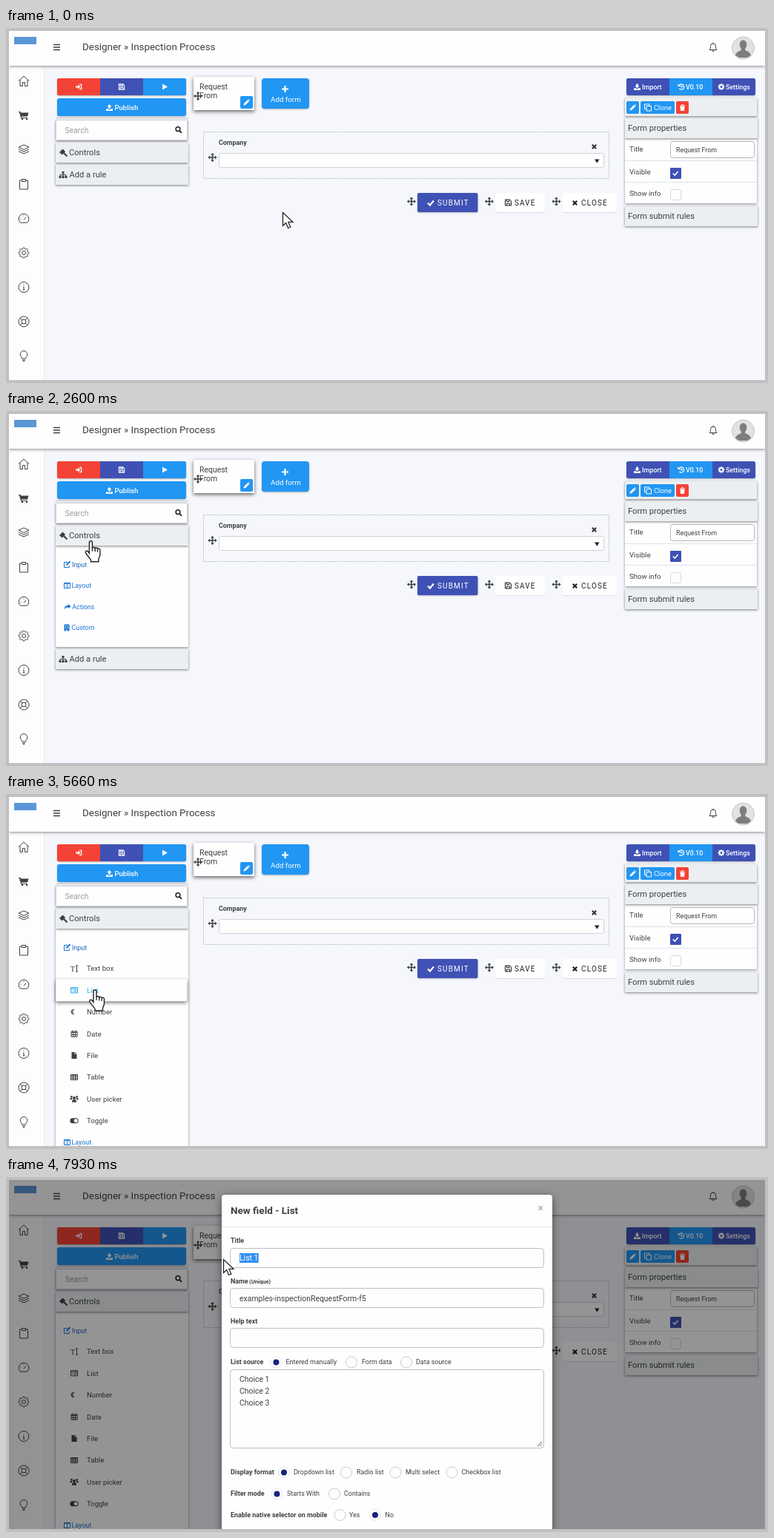
Recreate the animation shown at these times as an HTML page with a canvas. Size 1028 by 480 pixels, loop 8 s.

```html
<!DOCTYPE html>
<html lang="en">
<head>
<meta charset="utf-8">
<title>Form designer</title>
<style>
html, body { margin: 0; width: 100%; height: 100%; overflow: hidden; background: #c0c0c0; }
canvas { display: block; }
</style>
</head>
<body>
<canvas id="stage" width="1028" height="480"></canvas>
<script>
const ctx = document.getElementById('stage').getContext('2d');
const LOOP = 8000;
const RED = '#f44336', INDIGO = '#3f51b5', BLUE = '#2196f3', NAVY = '#1a237e';
const INK = '#3c4043', LINK = '#1976d2', BAR = '#eceff1';

// ---------- helpers ----------
const ramp = (t, a, b) => {
  const p = Math.min(1, Math.max(0, (t - a) / (b - a)));
  return p * p * (3 - 2 * p);
};

function text(s, x, cy, size, color = INK, weight = 400, spacing = 0) {
  ctx.font = `${weight} ${size}px Roboto, sans-serif`;
  ctx.letterSpacing = spacing + 'px';
  ctx.fillStyle = color;
  ctx.fillText(s, x, cy + size * 0.355);
}

function box(x, y, w, h, fill, { r = 0, stroke, blur = 0, dy = 1, shade = 0.4 } = {}) {
  ctx.save();
  ctx.beginPath();
  ctx.roundRect(x, y, w, h, r);
  if (blur) {
    ctx.shadowColor = `rgba(0,0,0,${shade})`;
    ctx.shadowBlur = blur;
    ctx.shadowOffsetY = dy;
  }
  ctx.fillStyle = fill;
  ctx.fill();
  ctx.restore();
  if (stroke) {
    ctx.beginPath();
    ctx.roundRect(x + 0.5, y + 0.5, w - 1, h - 1, r);
    ctx.strokeStyle = stroke;
    ctx.lineWidth = 1;
    ctx.stroke();
  }
}

function icon(d, x, y, { fill, stroke, w = 1, s = 1 }) {
  const p = new Path2D(d);
  ctx.save();
  ctx.translate(x, y);
  ctx.scale(s, s);
  if (fill) { ctx.fillStyle = fill; ctx.fill(p, 'evenodd'); }
  if (stroke) { ctx.strokeStyle = stroke; ctx.lineWidth = w; ctx.stroke(p); }
  ctx.restore();
}

function disc(x, y, r, fill, stroke, w = 1) {
  ctx.beginPath();
  ctx.arc(x, y, r, 0, Math.PI * 2);
  if (fill) { ctx.fillStyle = fill; ctx.fill(); }
  if (stroke) { ctx.strokeStyle = stroke; ctx.lineWidth = w; ctx.stroke(); }
}

function gear(x, y, r, hole, solid) {
  ctx.beginPath();
  for (let i = 0; i < 32; i++) {
    const a = (i - 0.5) / 32 * Math.PI * 2, q = i % 4 < 2 ? r : r * 0.78;
    ctx.lineTo(x + q * Math.cos(a), y + q * Math.sin(a));
  }
  ctx.closePath();
  if (solid) { ctx.fillStyle = '#fff'; ctx.fill(); disc(x, y, hole, INDIGO); }
  else { ctx.strokeStyle = INK; ctx.lineWidth = 1; ctx.stroke(); disc(x, y, hole, null, INK); }
}

// ---------- icon shapes, centred on 0,0 ----------
const I = {
  move: 'M-6 0l2.5-2.5v1.7h2.7v-2.7h-1.7L0-6l2.5 2.5h-1.7v2.7h2.7v-1.7L6 0l-2.5 2.5v-1.7h-2.7v2.7h1.7L0 6l-2.5-2.5h1.7v-2.7h-2.7v1.7z',
  check: 'M-4 0l3 3 5-6',
  times: 'M-2.7-2.7l5.4 5.4M2.7-2.7l-5.4 5.4',
  save: 'M-4-4h6l2 2v6h-8zM-2-4v2.5h3.5v-2.5M-2 4v-3h4v3',
  play: 'M-3-4l7 4-7 4z',
  upload: 'M0-5l3.5 3.5h-2v3h-3v-3h-2zM-5 2h3v1h4v-1h3v3h-10z',
  download: 'M0 2l3.5-3.5h-2v-3h-3v3h-2zM-5 2h3l2 1.4 2-1.4h3v3h-10z',
  exitArrow: 'M-4-1h3v-2l3.5 3-3.5 3v-2h-3z',
  exitFrame: 'M1-3.2h2.6v6.4h-2.6',
  pencil: 'M-4 4l.6-2.6 5-5 2 2-5 5zM2.2-4l.6-.5 2 2-.6.6z',
  trash: 'M-3.5-3h7v1h-7zM-1.2-4.2h2.4v1h-2.4zM-3-1.5h6l-.5 6h-5z',
  clone: 'M-2-2h6.5v6.5h-6.5zM-2 2h-2.5v-6.5h6.5v2.5',
  history: 'M-3.2-1.6A3.6 3.6 0 1 1-2.6 2.5M0-2v2.2h1.8',
  historyTip: 'M-4.6-4v3.6h3.6z',
  sitemap: 'M-1.5-4.5h3v3h-3zM-5.5 1.5h3v3h-3zM-1.5 1.5h3v3h-3zM2.5 1.5h3v3h-3z',
  sitemapLines: 'M0-1.5v3M-4 1.5v-1.5h8v1.5',
  gavel: 'M-5.5-.5l4.5-4.5 3.6 3.6-4.5 4.5z',
  edit: 'M2.3 1v3h-6.8v-7h4.5',
  columns: 'M-4-3.5h8v7h-8zM0-3.5v7M-4-2.8h8',
  share: 'M1-4.5l4 3.5-4 3.5v-2c-3 0-4.5.6-5.5 3.2-.4-3.5 1.4-6 5.5-6.2z',
  building: 'M-3.5-4.5h7v9h-7zM-2-3h1.2v1.2h-1.2zM.8-3h1.2v1.2h-1.2zM-2-.5h1.2v1.2h-1.2zM.8-.5h1.2v1.2h-1.2zM-.7 2.5h1.4v2h-1.4z',
  list: 'M-4.5-3.5h9v7h-9zM-4.5-2.7h9M-3-.7h1M-1-.7h4.5M-3 1.5h1M-1 1.5h4.5',
  date: 'M-4-3h8v7h-8zM-4-1.8h8M-4 1.2h8M-1.3-1.5v5.5M1.4-1.5v5.5M-2.2-4.7v2M2.2-4.7v2',
  file: 'M-3.5-4.5h4v3h3v6h-7zM1.2-4.5l2.3 2.3h-2.3z',
  table: 'M-4.5-3.5h9v7h-9zM-4.5-2.8h9M-4.5-.8h9M-4.5 1.4h9M-1.5-3v6.5M1.5-3v6.5',
  users: 'M-2-1.5a2 2 0 1 1 4 0a2 2 0 1 1-4 0zM-3 4.3c0-3 1-3.6 3-3.6s3 .6 3 3.6zM-5-3a1.4 1.4 0 1 1 2.8 0a1.4 1.4 0 1 1-2.8 0zM2.2-3a1.4 1.4 0 1 1 2.8 0a1.4 1.4 0 1 1-2.8 0zM-5.6 1c0-2 .5-2.5 2.6-2.3l.4 2zM5.6 1c0-2-.5-2.5-2.6-2.3l-.4 2z',
  toggle: 'M-2.2-3.5h4.4a3.5 3.5 0 0 1 0 7h-4.4a3.5 3.5 0 0 1 0-7zM2.2-2.5a2.5 2.5 0 1 0 .01 0z',
  home: 'M-7-.5l7-6.5 7 6.5M-5-2v8.5h3.5v-5h3v5h3.5v-8.5',
  cart: 'M-7-5h2.5l.6 1.5h10.4l-1.5 5h-8.3l.3 1.2h7.5v1h-8.5l-2-7.7h-1z',
  layers: 'M0-6l7 3.2-7 3.2-7-3.2zM-7 0l7 3.2 7-3.2M-7 2.8l7 3.2 7-3.2',
  clipboard: 'M-2.5-5h-3v12h11v-12h-3M-2.5-6.5h5v3h-5z',
  gauge: 'M-4.5 5.2A6.8 6.8 0 1 1 4.5 5.2zM0 1.2l3-3.4M-4.6 0h1M0-4.6v1',
  bulb: 'M-2.5 3.5c0-2-2.3-3-2.3-5.7a4.8 4.8 0 0 1 9.6 0c0 2.7-2.3 3.7-2.3 5.7zM-2 5.5h4M-1.2 7h2.4',
  bell: 'M-5 3.5c1.5-1.5 1.5-3 1.5-5a3.5 3.5 0 0 1 7 0c0 2 0 3.5 1.5 5zM-1.3 4.2a1.3 1.6 0 0 0 2.6 0M0-5v-1.3',
  buoy: 'M-5-5l3 3M5-5l-3 3M-5 5l3-3M5 5l-3-3',
  arrow: 'M0 0v18l4.2-4 2.9 7 3.2-1.4-2.9-6.7h6z',
  hand: 'M-2 2a2 2 0 0 1 4 0v8c.3-2 3.6-2 3.8.3.6-1.6 3.4-1.2 3.5.7.8-1.3 3.2-.8 3.2 1.2v6c0 3-2 4.5-2 7v2.8h-10.5v-2.5c-1.5-2.5-4.5-5-7-9.5-1-2 1.5-3.5 3-2l2 2.5z',
  handLines: 'M2 9v5M5.8 11v3.5M9.3 12v3',
  beam: 'M-3-8.5q3 0 3 1.5v14q0 1.5-3 1.5M3-8.5q-3 0-3 1.5v14q0 1.5 3 1.5'
};

// ---------- page ----------
function drawFrame() {
  box(4, 4, 1020, 472, '#f5f7fc');
  box(4, 52, 47, 424, '#fdfdfd');
  box(51, 52, 1, 424, '#e9ebf0');
  box(4, 4, 1020, 47, '#fefefe', { blur: 4, shade: 0.45 });
  box(11, 12, 30, 10, '#5b96d6');
  icon('M-4.5-3.5h9M-4.5 0h9M-4.5 3.5h9', 68.5, 26, { stroke: INK, w: 1.6 });
  text('Designer » Inspection Process', 103, 25.5, 13.4);
  icon(I.bell, 954, 26, { stroke: INK });

  disc(994.5, 27, 15, '#e2e2e2', '#c4c4c4');
  ctx.save();
  ctx.beginPath();
  ctx.arc(994.5, 27, 14, 0, 7);
  ctx.clip();
  icon('M-4.8-5a4.8 5.8 0 0 1 9.6 0c0 3-1 4.6-2 5.6v2.4c2 1.6 8 2 8.4 10h-22.4c.4-8 6.4-8.4 8.4-10v-2.4c-1-1-2-2.6-2-5.6z', 994.5, 27, { fill: '#7d7d7d' });
  ctx.restore();

  const thin = { stroke: INK };
  icon(I.home, 24, 72, thin);
  icon(I.cart, 24, 118, { fill: INK });
  disc(22, 123, 1.3, INK);
  disc(28, 123, 1.3, INK);
  icon(I.layers, 24, 164, thin);
  icon(I.clipboard, 24, 211, thin);
  icon(I.gauge, 24, 258, thin);
  gear(24, 304, 7, 2.5);
  disc(24, 350.5, 7, null, INK);
  icon('M-1-.5h1v4M-1.3 3.5h2.8M-.5-3.3h1', 24, 350.5, thin);
  disc(24, 397, 7, null, INK);
  disc(24, 397, 3, null, INK);
  icon(I.buoy, 24, 397, thin);
  icon(I.bulb, 24, 443.5, thin);
}

function bar(x, y, label, lx) {
  box(x, y, 179, 27, BAR, { blur: 3, shade: 0.5 });
  text(label, lx, y + 13.5, 11.15);
}

function tripleButtons(x, colors) {
  box(x, 68, 174, 23, colors[1], { r: 3, blur: 2, shade: 0.3 });
  ctx.save();
  ctx.beginPath();
  ctx.roundRect(x, 68, 174, 23, 3);
  ctx.clip();
  colors.forEach((c, i) => box(x + i * 58, 68, 58, 23, c));
  ctx.restore();
}

function drawCentre() {
  box(253, 66, 82, 45, '#fefefe', { blur: 5, dy: 2, shade: 0.6 });
  text('Request', 261, 79, 10.45);
  text('From', 261, 91, 10.45);
  icon(I.move, 259, 92, { fill: INK });
  box(316, 92, 17, 17, BLUE, { r: 2 });
  icon(I.pencil, 324.5, 100.5, { fill: '#fff' });
  box(345, 68, 64, 41, BLUE, { r: 4, blur: 2, shade: 0.3 });
  icon('M-4.5 0h9M0-4.5v9', 376.5, 82.5, { stroke: '#fff', w: 2.2 });
  text('Add form', 357, 97, 9.8, '#fff');

  ctx.setLineDash([2, 1]);
  ctx.strokeStyle = '#bfc2c8';
  ctx.lineWidth = 1;
  ctx.strokeRect(266.5, 140.5, 547, 63);
  ctx.setLineDash([]);
  text('Company', 287, 155, 8.9, INK, 700);
  icon(I.times, 793.5, 160.5, { stroke: '#333', w: 2 });
  icon(I.move, 278.5, 175, { fill: INK });
  box(287, 169, 520, 20, '#fefefe', { r: 2, stroke: '#cfd1d6' });
  icon('M-3.2-2.5h6.4l-3.2 5.2z', 797.3, 180, { fill: '#222' });

  [547, 652, 742.5].forEach(x => icon(I.move, x, 234.5, { fill: INK }));
  box(555, 223, 81.5, 26, INDIGO, { r: 2, blur: 2, shade: 0.25 });
  box(660, 223, 67, 26, '#fefefe', { r: 2, blur: 1, shade: 0.1 });
  box(751, 223, 73, 26, '#fefefe', { r: 2, blur: 1, shade: 0.1 });
  icon(I.check, 573, 236.5, { stroke: '#fff', w: 2.2 });
  text('SUBMIT', 582, 236, 10, '#fff', 400, 1.15);
  icon(I.save, 677.5, 236, { stroke: '#222' });
  text('SAVE', 686, 236, 10, '#222', 400, 1.15);
  icon(I.times, 767.5, 236.5, { stroke: '#222', w: 2.2 });
  text('CLOSE', 776, 236, 10, '#222', 400, 1.15);
}

function drawRight() {
  tripleButtons(837, [INDIGO, BLUE, INDIGO]);
  icon(I.download, 851.5, 79.5, { fill: '#fff', s: 0.9 });
  text('Import', 858, 79.5, 8.9, '#fff', 500);
  icon(I.history, 911, 79.5, { stroke: '#fff', w: 1.3 });
  icon(I.historyTip, 911, 79.5, { fill: '#fff' });
  text('V0.10', 917, 79.5, 8.9, '#fff', 500);
  gear(965, 79.5, 4.5, 1.5, true);
  text('Settings', 971, 79.5, 8.9, '#fff', 500);

  box(835, 95, 178, 24, BAR, { blur: 3, shade: 0.5 });
  box(837, 99, 17, 17, BLUE, { r: 2 });
  icon(I.pencil, 845.5, 107.5, { fill: '#fff' });
  box(856, 99, 46, 17, BLUE, { r: 2 });
  icon(I.clone, 866, 107.5, { stroke: '#fff' });
  text('Clone', 874, 107.5, 9.4, '#fff');
  box(904, 99, 17, 17, RED, { r: 2 });
  icon(I.trash, 912.5, 107.5, { fill: '#fff' });

  box(835, 149, 178, 88, '#fefefe', { blur: 3, shade: 0.45 });
  bar(835, 122, 'Form properties', 839);
  box(835, 179, 178, 1, '#dde1e8');
  box(835, 208, 178, 1, '#dde1e8');
  text('Title', 841, 164, 9.6);
  text('Visible', 841, 194.5, 9.6);
  text('Show info', 841, 223.5, 9.6);
  box(896, 153, 114, 23, '#fefefe', { r: 3, stroke: '#b4b6ba' });
  text('Request From', 904, 164.5, 8.9);
  box(896, 189, 15, 15, INDIGO, { r: 1 });
  icon(I.check, 903.2, 196.5, { stroke: '#fff', w: 1.8, s: 0.85 });
  box(896, 218, 15, 15, '#fefefe', { r: 2, stroke: '#d8dae0' });
  bar(835, 241, 'Form submit rules', 839);
}

const FIELDS = ['Text box', 'List', 'Number', 'Date', 'File', 'Table', 'User picker', 'Toggle'];

function fieldIcon(i, y, c) {
  const x = 92, line = { stroke: c };
  if (i === 0) {
    ctx.font = '11px "Liberation Serif", serif';
    ctx.fillStyle = c;
    ctx.fillText('T', 86.5, y + 4);
    icon('M-1.3-4.2h2.6M0-4.2v8.4M-1.3 4.2h2.6', 95.5, y, line);
  } else if (i === 2) text('€', 87, y, 9.6, c, 700);
  else if (i === 4 || i > 5) icon([I.file, I.users, I.toggle][i === 4 ? 0 : i - 5], x, y, { fill: c });
  else icon({ 1: I.list, 3: I.date, 5: I.table }[i], x, y, line);
}

function fieldLift(i, t) {
  if (i === 0) return ramp(t, 4980, 5150) - ramp(t, 5150, 5350);
  return i === 1 && t < 6000 ? ramp(t, 5200, 5640) : 0;
}

function drawFields(t) {
  FIELDS.forEach((label, i) => {
    const y = 236 + i * 29.4, lift = fieldLift(i, t);
    if (lift > 0) box(67, y - 15.2, 177, 30, '#fefefe', { r: 2, blur: 5 * lift, dy: 2, shade: 0.55 * lift });
    const c = lift > 0.5 && t < 5930 ? '#29a9ea' : INK;
    fieldIcon(i, y, c);
    text(label, 109, y, 9.6, c);
  });
}

function drawLeft(t) {
  tripleButtons(69, [RED, INDIGO, BLUE]);
  icon(I.exitArrow, 98, 79.5, { fill: '#fff' });
  icon(I.exitFrame, 98, 79.5, { stroke: '#fff', w: 1.3 });
  icon(I.save, 156, 79.5, { stroke: '#fff', w: 1.2, s: 0.9 });
  icon(I.play, 214, 79.5, { fill: '#fff' });
  box(67, 121, 179, 1, '#c9ccd2');
  box(69, 95, 174, 24, BLUE, { r: 3, blur: 2, shade: 0.3 });
  icon(I.upload, 139.5, 107.5, { fill: '#fff', s: 0.9 });
  text('Publish', 146.5, 107.5, 9.5, '#fff', 500);
  box(67, 124, 178, 28, '#fefefe', { r: 1, stroke: '#cdd0d5', blur: 3, shade: 0.5 });
  text('Search', 79.5, 138.5, 10.4, '#9a9da1');
  disc(232, 136.7, 2.9, null, '#222', 1.5);
  icon('M0 0l3 3', 234, 138.8, { stroke: '#222', w: 1.8 });

  const open = ramp(t, 2180, 2530), sub = ramp(t, 3840, 4220) * 235;
  const h = (137 + sub) * open;
  if (h > 0) {
    box(67, 182, 179, h, '#fefefe', { blur: 3, shade: 0.45 });
    ctx.save();
    ctx.beginPath();
    ctx.rect(60, 182, 192, h);
    ctx.clip();
    icon(I.edit, 83, 207.5, { stroke: LINK });
    icon('M-1.5.8l5-5', 83, 207.5, { stroke: LINK, w: 2 });
    text('Input', 89, 207.5, 8.9, '#1d5fc0');
    if (sub > 0) {
      ctx.save();
      ctx.beginPath();
      ctx.rect(60, 218, 192, sub);
      ctx.clip();
      drawFields(t);
      ctx.restore();
    }
    icon(I.columns, 82.5, 236 + sub, { stroke: LINK });
    text('Layout', 88.5, 236 + sub, 8.9, LINK);
    icon(I.share, 83, 265 + sub, { fill: LINK, s: 0.9 });
    text('Actions', 89.3, 265 + sub, 8.9, LINK);
    icon(I.building, 82, 293 + sub, { fill: LINK });
    text('Custom', 88.5, 293 + sub, 8.9, LINK);
    ctx.restore();
  }
  bar(67, 155, 'Controls', 85);
  icon(I.gavel, 77.5, 168.5, { fill: INK });
  icon('M0 0l5 5', 77.5, 168.5, { stroke: INK, w: 2.2 });
  const y = 185 + h;
  bar(67, y, 'Add a rule', 85.5);
  icon(I.sitemap, 77, y + 13.5, { fill: INK });
  icon(I.sitemapLines, 77, y + 13.5, { stroke: INK });
  if (t >= 2900 && t < 4800) box(4, 474, 66, 2, '#222');
}

// ---------- dialog ----------
function radios(y, label, options, chosen, dot) {
  text(label, 303, y, 8.95, INK, 700);
  options.forEach(([x, tx, name], i) => {
    disc(x, y + 0.5, 7.5, '#fefefe', i === chosen ? '#e6e6ec' : '#c9cacd');
    if (i === chosen) disc(x, y + 0.5, 4, dot);
    text(name, tx, y, 8.95);
  });
}

function drawTitleField(t, mouse) {
  text('List 1', 315, 109.7, 10.45);
  if (t < 7660) {
    if ((t - 5900) % 1060 < 530) box(340, 103, 1, 13, '#111');
    return;
  }
  // selection grows leftwards, snapping to letters
  ctx.font = '10.45px Roboto, sans-serif';
  const edges = [...'List 1'].map((c, i) => 315 + ctx.measureText('List 1'.slice(0, i)).width);
  const from = edges.find((e, i) => mouse.x <= (e + (edges[i + 1] || 341)) / 2);
  if (from === undefined) return;
  ctx.save();
  ctx.beginPath();
  ctx.rect(from, 103, 340.7 - from, 13);
  ctx.clip();
  box(314, 102, 30, 15, '#3390f0');
  text('List 1', 315, 109.7, 10.45, '#fff');
  ctx.restore();
}

function drawDialog(t, mouse) {
  box(4, 4, 1020, 472, 'rgba(0,0,0,.42)');
  box(291, 24, 446, 470, '#fefefe', { r: 4, blur: 12, dy: 3, shade: 0.5 });
  text('New field - List', 303, 45.5, 13.5, INK, 700);
  icon(I.times, 721, 42, { stroke: '#a5a5a5', w: 1.3 });
  box(291, 67, 446, 1, '#e3e5e8');
  [['Title', 86, 97], ['Name', 141, 151], ['Help text', 195, 205]].forEach(([label, ly, y]) => {
    text(label, 303, ly, 8.95, INK, 700);
    box(302, y - 1, 424, 27, '#fefefe', { r: 4, stroke: '#bcbec2' });
  });
  text('(Unique)', 328, 141.3, 7.6, INK, 700);
  drawTitleField(t, mouse);
  text('examples-inspectionRequestForm-f5', 315, 164, 10.45);

  const late = t < 6000 ? '#424248' : NAVY;
  radios(250, 'List source', [[364.5, 377.5, 'Entered manually'], [466, 480, 'Form data'], [540, 553, 'Data source']], 0, NAVY);
  box(302, 260, 424, 107, '#fefefe', { r: 4, stroke: '#bcbec2' });
  [1, 2, 3].forEach(n => text('Choice ' + n, 315, 257.5 + n * 16, 10.45));
  icon('M0 6l6-6M3.5 6l2.5-2.5', 717, 358, { stroke: '#555' });
  radios(399, 'Display format', [[375, 388, 'Dropdown list'], [459, 473, 'Radio list'], [525.5, 539, 'Multi select'], [601.5, 614.5, 'Checkbox list']], 0, NAVY);
  radios(428, 'Filter mode', [[365.5, 379, 'Starts With'], [443, 456, 'Contains']], 0, late);
  radios(456.5, 'Enable native selector on mobile', [[450.5, 463, 'Yes'], [498, 511.5, 'No']], 1, late);
}

// ---------- pointer ----------
const PATH = [
  [0, 373, 249], [520, 373, 249], [530, 373, 250], [680, 373, 250], [1530, 219, 171],
  [2060, 109, 174], [2500, 109, 174], [3000, 160, 190], [3240, 108, 204], [3330, 108, 204],
  [3530, 110, 212], [4750, 110, 212], [5450, 120, 265], [6050, 120, 265], [6730, 209, 249],
  [7560, 350, 107], [7630, 350, 107], [7930, 293, 111], [LOOP, 293, 111]
];

function pointer(t) {
  const i = PATH.findIndex(p => p[0] > t);
  const a = PATH[i - 1], b = PATH[i], p = ramp(t, a[0], b[0]);
  return { x: a[1] + (b[1] - a[1]) * p, y: a[2] + (b[2] - a[2]) * p };
}

function drawPointer(t, { x, y }) {
  const overInput = t > 5930 && x > 302 && y > 97 && y < 123;
  const hand = (t >= 1600 && t < 2750) || (t >= 3130 && t < 6150);
  if (overInput) icon(I.beam, x, y, { stroke: '#222' });
  else if (hand) {
    icon(I.hand, x, y, { fill: '#fff', stroke: '#222', w: 1.4 });
    icon(I.handLines, x, y, { stroke: '#222', w: 1.2 });
  } else icon(I.arrow, x + 0.5, y + 0.5, { fill: '#fff', stroke: '#222', w: 1.3 });
}

function draw(t) {
  const mouse = pointer(t);
  ctx.fillStyle = '#c0c0c0';
  ctx.fillRect(0, 0, 1028, 480);
  ctx.save();
  ctx.beginPath();
  ctx.rect(4, 4, 1020, 472);
  ctx.clip();
  drawFrame();
  drawCentre();
  drawRight();
  drawLeft(t);
  if (t >= 5930) drawDialog(t, mouse);
  drawPointer(t, mouse);
  ctx.restore();
}

const start = performance.now();
function tick() {
  draw((performance.now() - start) % LOOP);
  requestAnimationFrame(tick);
}
tick();
</script>
</body>
</html>
```
